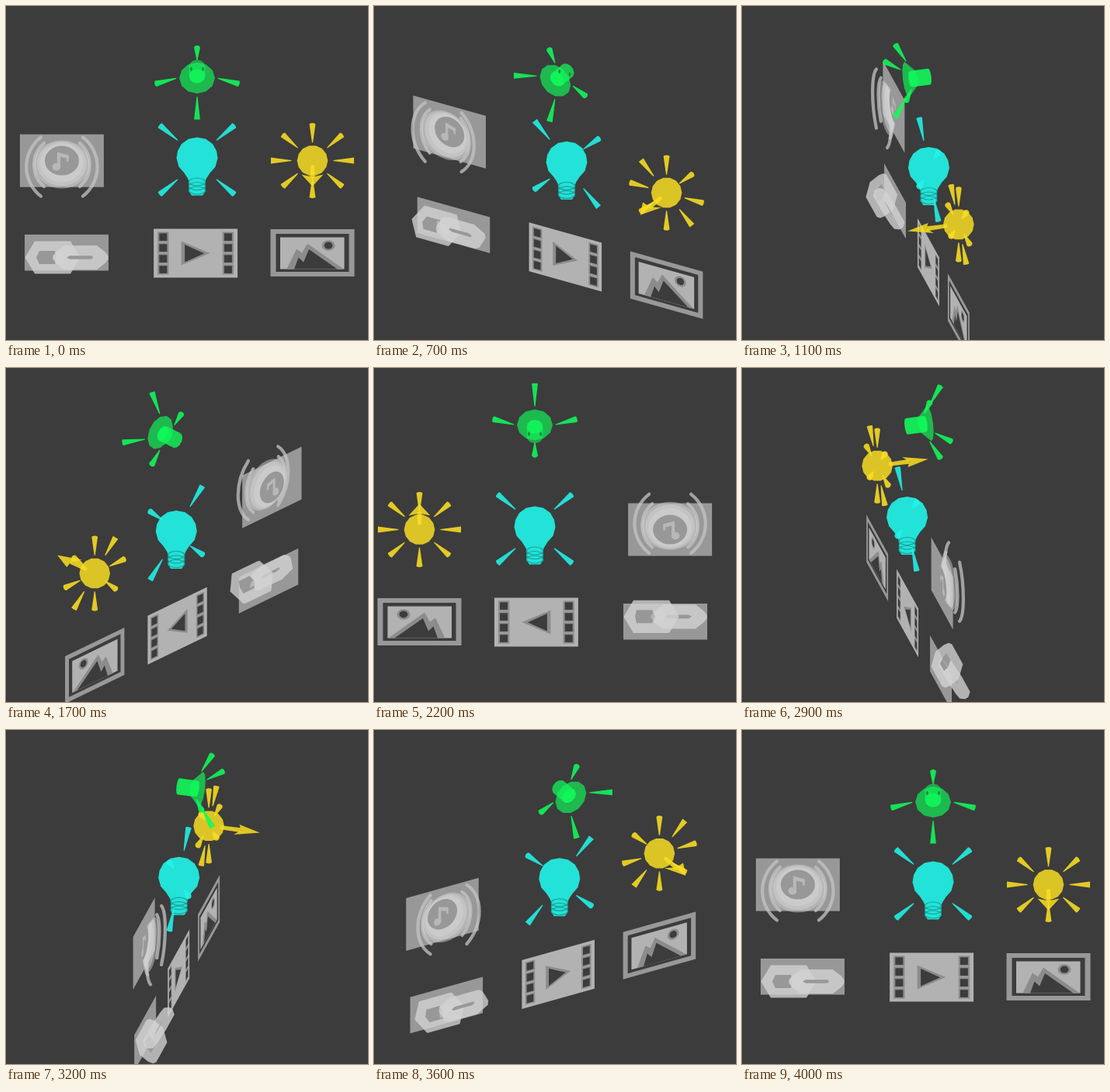
Write an HTML page that moves like this. It is 466 by 431 pixels and loops after 4500 ms.

```html
<!DOCTYPE html>
<html lang="en">
<head>
<meta charset="utf-8">
<title>Rotating icons</title>
<style>
html, body { margin: 0; width: 100%; height: 100%; overflow: hidden; background: #3c3c3c; }
svg { display: block; width: 466px; height: 431px; }
</style>
</head>
<body>
<svg id="stage" viewBox="0 0 466 431"></svg>
<script>
const stage = document.getElementById('stage');
const LOOP = 4500;
// Moments, in tenths of a second, at which the scene turns by 15 degrees.
const TURNS = [5, 7, 8, 9, 11, 12, 14, 15, 17, 18, 20, 21, 23, 24, 26, 27, 29, 30, 32, 33, 35, 36, 38, 40];
const AXIS = 226.5, TILT = 0.487, RISE = 0.873;
const BG = '#3c3c3c', CARD = '#989898', EDGE = '#8c8c8c', PANEL = '#b2b2b2', LIGHT = '#d4d4d4';
const GREEN = '#10fa5a', CYAN = '#21f4e8', YELLOW = '#fade22';

let cos = 1, sin = 0;

// Orthographic view: x to the right, v up, z away from the viewer.
function project(o, x, v, z) {
  const X = o.x + x, Z = o.z + z;
  return [AXIS + X * cos + Z * sin, o.y - RISE * v + TILT * (X * sin - Z * cos)];
}

function hull(points) {
  const sorted = [...points].sort((a, b) => a[0] - b[0] || a[1] - b[1]);
  const half = list => {
    const out = [];
    for (const p of list) {
      while (out.length > 1) {
        const a = out[out.length - 2], b = out[out.length - 1];
        if ((b[0] - a[0]) * (p[1] - a[1]) - (b[1] - a[1]) * (p[0] - a[0]) > 0) break;
        out.pop();
      }
      out.push(p);
    }
    return out.slice(0, -1);
  };
  return half(sorted).concat(half(sorted.reverse()));
}

const poly = (points, fill, alpha = 1) =>
  `<polygon points="${points.map(p => p[0].toFixed(2) + ',' + p[1].toFixed(2)).join(' ')}" fill="${fill}" fill-opacity="${alpha}"/>`;
const rect = (x, y, w, h, fill) => `<rect x="${x}" y="${y}" width="${w}" height="${h}" fill="${fill}"/>`;
const oval = (x, y, rx, ry, fill, alpha = 1) =>
  `<ellipse cx="${x}" cy="${y}" rx="${rx}" ry="${ry}" fill="${fill}" fill-opacity="${alpha}"/>`;

const cross = (a, b) => [a[1] * b[2] - a[2] * b[1], a[2] * b[0] - a[0] * b[2], a[0] * b[1] - a[1] * b[0]];
const unit = a => a.map(n => n / Math.hypot(...a));

// Projected circle of radius r around p, at right angles to the axis d.
function ring(o, p, d, r) {
  const e = unit(cross(d, Math.abs(d[1]) > 0.9 ? [1, 0, 0] : [0, 1, 0]));
  const f = unit(cross(d, e));
  return Array.from({ length: 12 }, (_, i) => {
    const c = r * Math.cos(i * Math.PI / 6), s = r * Math.sin(i * Math.PI / 6);
    return project(o, ...p.map((n, k) => n + c * e[k] + s * f[k]));
  });
}

function cone(o, a, b, ra, rb, fill, alpha) {
  const d = unit(b.map((n, i) => n - a[i]));
  return poly(hull([...ring(o, a, d, ra), ...ring(o, b, d, rb)]), fill, alpha);
}

const ray = (o, a, b, fill) => cone(o, a, b, 0.6, 3.9, fill, 0.88);

// Flat drawing that turns with its card, dz behind the card plane.
function layer(o, dz, content) {
  const [x, y] = project(o, 0, 0, dz);
  return `<g transform="matrix(${cos} ${TILT * sin} 0 1 ${x} ${y})">${content}</g>`;
}

function spot(o) {
  const back = [0, 0, 1];
  const depth = Math.abs(sin);
  let out = cone(o, [0, 0, -20], [0, 0, -8], 23, 10.5, GREEN, 0.66);
  out += cone(o, [0, 0, -14], [0, 0, 10], 10.5, 10.5, GREEN, 0.55 + 0.35 * depth);
  out += poly(ring(o, [0, 0, -15.5], back, 10.3), GREEN, 0.75);
  if (depth < 0.5) {
    for (const x of [-7.6, 7.6]) out += oval(...project(o, x, 0, 4), 1.3, 2.6, '#1c7a3c', 0.9);
  }
  for (const [x, v] of [[1, 0], [-1, 0], [0, 1], [0, -1]]) {
    out += ray(o, [27 * x, 27 * v, -21], [53 * x, 53 * v, -35], GREEN);
  }
  return out;
}

function bulb(o) {
  const side = [[11, -27], [20, -20.5], [25, -11.5], [26.5, -2], [23.5, 9], [16.5, 17], [12, 24], [10.5, 28], [10.3, 41], [7, 46]];
  const outline = [[0, -29], ...side, ...side.map(([x, y]) => [-x, y]).reverse()];
  const [x, y] = project(o, 0, 0, 0);
  let out = `<g transform="translate(${x} ${y})">` + poly(outline, CYAN, 0.9);
  for (const cy of [28.5, 34, 39.5]) {
    out += `<ellipse cy="${cy}" rx="10.6" ry="5" fill="none" stroke="#18a49c" stroke-width="1.2"/>`;
  }
  out += '</g>';
  for (const sx of [-1, 1]) for (const sv of [-1, 1]) {
    out += ray(o, [25 * sx, 29 * sv, 0], [47.5 * sx, 50.5 * sv, 0], CYAN);
  }
  return out;
}

function sun(o) {
  const [x, y] = project(o, 0, 0, 0);
  const globe = Array.from({ length: 14 }, (_, i) =>
    [x + 19.8 * Math.cos(i * Math.PI / 7), y + 19.8 * Math.sin(i * Math.PI / 7)]);
  let out = poly(globe, YELLOW, 0.84);
  for (let i = 0; i < 8; i++) {
    const c = Math.cos(i * Math.PI / 4), s = Math.sin(i * Math.PI / 4);
    out += ray(o, [27 * c, 27 * s, 0], [53.5 * c, 53.5 * s, 0], YELLOW);
  }
  out += cone(o, [0, 0, -16], [0, 0, -42], 2.5, 3, YELLOW, 0.85);
  out += poly([[-14, -37], [0, -68], [14, -37], [0, -43]].map(([px, z]) => project(o, px, 0, z)), YELLOW, 0.85);
  return out;
}

function sound(o) {
  const arcs = (x, y, r) =>
    `<path d="M${-x} ${-y}A${r} ${r} 0 0 0 ${-x} ${y}M${x} ${-y}A${r} ${r} 0 0 1 ${x} ${y}" fill="none" stroke="#c4c4c4" stroke-opacity=".75" stroke-width="4.2" stroke-linecap="round" vector-effect="non-scaling-stroke"/>`;
  const note = '<path d="M-6 -11L9 -7V1H6V-3L-2 -5V8H-6Z" fill="#b8b8b8"/>' + oval(-7, 8, 5.5, 4.8, '#b8b8b8');
  return layer(o, 0, rect(-54, -34, 108, 68, CARD))
    + layer(o, -16, arcs(27, 38, 48))
    + layer(o, -11, arcs(23, 28, 37))
    + layer(o, -10, oval(0, 0, 36, 31, LIGHT, 0.45))
    + layer(o, -8, oval(0, 0, 32, 28.5, LIGHT, 0.5))
    + layer(o, -5, oval(0, 0, 28, 25, LIGHT, 0.5))
    + layer(o, 0, oval(0, 0, 22, 19, CARD) + note);
}

function chain(o) {
  // A six-sided link, leaning towards (-1) or away from (1) the viewer.
  const link = (x, lean) => {
    const at = (dx, w, t) => project(o, x + dx, 0.866 * w - 0.5 * lean * t, -13 + 0.5 * lean * w + 0.866 * t);
    const hex = (end, mid, w, t) =>
      [[-end, 0], [-mid, w], [mid, w], [end, 0], [mid, -w], [-mid, -w]].map(([dx, dw]) => at(dx, dw, t));
    const body = hull([...hex(32, 21, 17, 8), ...hex(32, 21, 17, -8), ...hex(35.5, 23, 21, 2.5), ...hex(35.5, 23, 21, -2.5)]);
    return poly(body, LIGHT, 0.78);
  };
  const hole = (x, half, lean, w) => {
    const at = (dx, dw) => project(o, x + dx, 0.866 * dw, -13 + 0.5 * lean * dw);
    return poly([[-half, 0], [-half + 4, w], [half - 2, w], [half, 0], [half - 2, -w], [-half + 4, -w]].map(p => at(...p)), CARD);
  };
  const facing = cos > 0;
  let out = layer(o, 0, rect(-54, -23.3, 108, 46.6, CARD));
  out += facing ? hole(-26, 0, 1, 0) : '';
  out += link(-18, 1) + hole(facing ? -26 : -17, facing ? 13 : 17, 1, facing ? 8.5 : 4.5);
  out += link(18, -1) + hole(facing ? 17 : 26, facing ? 17 : 13, -1, facing ? 4.5 : 8.5);
  return out + overlap(o, facing);
}

// Pale joint where the two links cross.
function overlap(o, facing) {
  const x = facing ? -9 : 9;
  const lean = facing ? -1 : 1;
  const pts = [[-9, 0], [-4, 15], [5, 15], [10, 0], [5, -15], [-4, -15]];
  return poly(pts.map(([dx, w]) => project(o, x + dx, 0.866 * w, -13 + 0.5 * lean * w)), LIGHT, 0.5);
}

function film(o) {
  let art = rect(-54, -31.5, 108, 63, PANEL);
  for (const x of [-41.8, 41.8]) {
    for (let i = 0; i < 4; i++) {
      const y = -21 + 14 * i;
      art += rect(x - 7.2, y - 6.6, 14.4, 13.2, EDGE) + rect(x - 5, y - 4.7, 10, 9.6, BG);
    }
  }
  art += poly([[-18.5, -15.5], [18.5, 0], [-18.5, 15.5]], EDGE);
  art += poly([[-14, -11], [11, 0.2], [-14, 11.4]], BG);
  return layer(o, 0, art);
}

function picture(o) {
  const frame = `<path d="M-54 -30.5H54V30.5H-54ZM-47 -24.5V24.5H47V-24.5Z" fill="${CARD}"/>`;
  const art = rect(-47, -24.5, 94, 49, BG) + frame + rect(-41.5, -20, 82.5, 41, PANEL)
    + poly([[-33, 21], [-20.5, -5], [-13.5, 0], [-6.5, -12], [40, 21]], EDGE)
    + poly([[-23.5, 21], [-18, 6], [-11.5, 12], [-4.5, -4.5], [32, 21]], BG)
    + oval(20.5, -9.5, 8.5, 6.8, EDGE) + oval(20.5, -9.5, 5.4, 4.4, BG);
  return layer(o, 0, art);
}

const items = [
  { x: 19.5, y: 83.2, z: 0, draw: spot },
  { x: 19.5, y: 203, z: 9.2, draw: bulb },
  { x: 168, y: 204, z: 9.2, draw: sun },
  { x: -154.6, y: 204.1, z: 9.2, draw: sound },
  { x: -148.5, y: 322.7, z: 9.2, draw: chain },
  { x: 17.6, y: 323.5, z: 9.2, draw: film },
  { x: 168, y: 323, z: 9.2, draw: picture }
];

function render(step) {
  const a = step * Math.PI / 12;
  cos = Math.cos(a);
  sin = Math.sin(a);
  const depth = o => o.z * cos - o.x * sin;
  stage.innerHTML = rect(0, 0, 466, 431, BG)
    + [...items].sort((p, q) => depth(q) - depth(p)).map(o => o.draw(o)).join('');
}

let shown = -1;
function tick() {
  const t = performance.now() % LOOP;
  const step = TURNS.filter(n => n * 100 <= t).length % 24;
  if (step !== shown) render(shown = step);
  requestAnimationFrame(tick);
}
tick();
</script>
</body>
</html>
```
